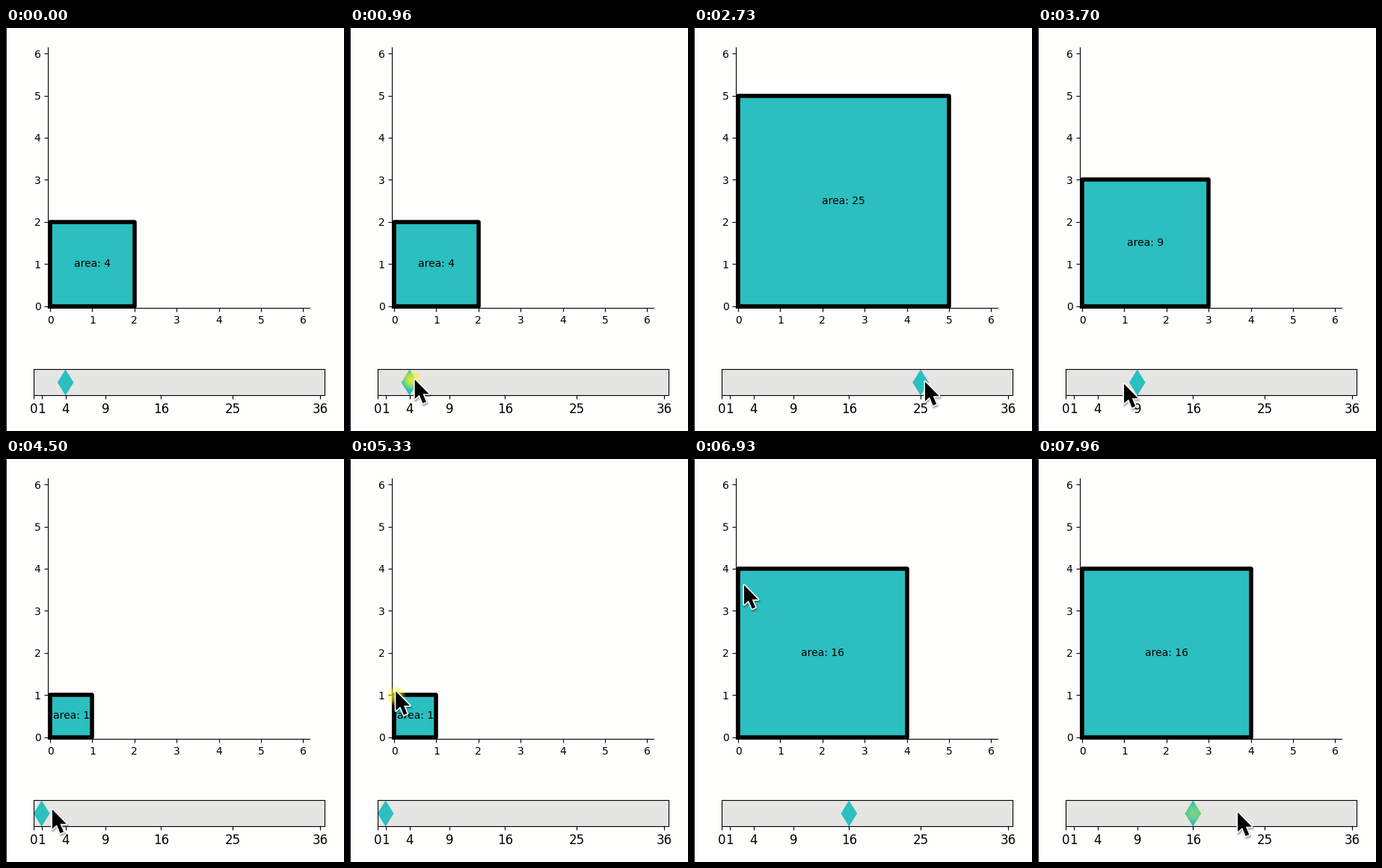
Recreate the animation shown at these times as a matplotlib script. Size 452x540 px, loop 8 s.

```python
import matplotlib.pyplot as plt
import numpy as np
from matplotlib.animation import FuncAnimation
from matplotlib.patches import Polygon, Rectangle

W, H, DPI = 452, 540, 100
LOOP, STEP = 8000, 25
TEAL, PAPER = "#2bbfbf", "#fefefd"
PT = 72 / DPI  # points per pixel

plt.rcParams["font.family"] = "DejaVu Sans"

# Cursor path: start time, end time, Bezier control (or None), end point.
ENTER = 60
START = (450, 293)
MOVES = [
    (60, 630, (180, 515), (82, 471)),
    (860, 1660, None, (214.5, 471)),
    (1700, 2060, None, (310, 474)),
    (2400, 2430, None, (309, 474)),
    (2730, 2800, None, (300, 476)),
    (3030, 3830, None, (101, 477)),
    (3930, 4200, None, (52, 477)),
    (4430, 4960, (160, 400), (61, 318)),
    (5220, 6000, (64, 250), (56, 181)),
    (6030, 6100, None, (56, 166.5)),
    (6300, 6360, None, (63.5, 169)),
    (6730, 6930, None, (67, 169)),
    (7000, 7400, (150, 420), (235, 490)),
    (7400, 7540, None, (208, 475)),
    (7620, 8100, None, (285, 473)),
]
# The slider snaps to square numbers, so the side length jumps.
SIDES = [(0, 2), (1140, 3), (1420, 4), (1930, 5), (3340, 4), (3580, 3),
         (3820, 2), (4180, 1), (5540, 2), (5760, 3), (6300, 4)]
PRESSES = [(860, (82, 472)), (5200, (61, 318.5)), (7600, (208, 475))]
GLOW_MS, GLOW_R = 600, 14
ARROW = np.array([(0, 0), (0, 26), (6, 20.6), (10.6, 31.8), (15.2, 29.9),
                  (10.7, 19.2), (18.8, 19.2)])


def cursor_at(t):
    pos = np.array(START, float)
    for t0, t1, control, end in MOVES:
        if t < t0:
            break
        end = np.array(end, float)
        s = min(1, (t - t0) / (t1 - t0))
        s = 1 - (1 - s) ** 2 if t0 == ENTER else s * s * (3 - 2 * s)
        mid = (pos + end) / 2 if control is None else np.array(control)
        pos = (1 - s) ** 2 * pos + 2 * s * (1 - s) * mid + s * s * end
    return pos


def side_at(t):
    return [side for start, side in SIDES if start <= t][-1]


def pixel_axes(x, y, w, h):
    return fig.add_axes([x / W, 1 - (y + h) / H, w / W, h / H])


# The small margin keeps the pixel size from rounding down.
fig = plt.figure(figsize=((W + 0.01) / DPI, (H + 0.01) / DPI), dpi=DPI,
                 facecolor=PAPER)

# Square plot
UNIT = 56.4
plot = pixel_axes(56.2, 25.7, 6.2 * UNIT, 6.2 * UNIT)
plot.set(xlim=(-0.05, 6.15), ylim=(-0.05, 6.15), xticks=range(7),
         yticks=range(7), facecolor=PAPER)
plot.spines[["top", "right"]].set_visible(False)
square = Polygon([(0, 0), (1, 0), (1, 1), (0, 1)], facecolor=TEAL,
                 edgecolor="black", lw=4, joinstyle="round", clip_on=False)
plot.add_patch(square)
label = plot.text(0, 0, "", ha="center", va="center", fontsize=10)

# Slider
slider = pixel_axes(37, 457.5, 388.5, 35)
slider.set(xlim=(0, 36.5), ylim=(-1, 1), yticks=[], facecolor="#e5e5e4",
           xticks=[n * n for n in range(7)])
slider.tick_params(labelsize=12)
handle = Polygon([(0, 0), (1, 1), (1, 0)], facecolor=TEAL, lw=0)
slider.add_patch(handle)

# Overlay in stage pixels
stage = fig.add_axes([0, 0, 1, 1])
yy, xx = np.mgrid[-1:1:57j, -1:1:57j]
halo = np.ones((57, 57, 4)) * (1, 0.96, 0.1, 1)
halo[..., 3] = 0.95 * np.clip(1 - xx ** 2 - yy ** 2, 0, 1) ** 1.2
glow = stage.imshow(halo, extent=(0, 1, 1, 0), aspect="auto", zorder=2)
stage.set(xlim=(0, W), ylim=(H, 0), autoscale_on=False)
stage.axis("off")
stage.add_patch(Rectangle((0, 0), 1, H, facecolor="#20202a", lw=0))


def arrow(offset, color, width, alpha=1):
    patch = Polygon(ARROW, facecolor=color, edgecolor=color, lw=width * PT,
                    alpha=alpha, joinstyle="round", zorder=3)
    stage.add_patch(patch)
    return patch, np.array(offset)


arrows = [arrow((1, 2.5), "black", 5, 0.1), arrow((1, 2), "black", 3.5, 0.15),
          arrow((0, 0), "white", 3.2), arrow((0, 0), "black", 0)]


def draw(i):
    t = i * STEP
    side = side_at(t)
    square.set_xy([(0, 0), (side, 0), (side, side), (0, side)])
    label.set_position((side / 2, side / 2))
    label.set_text(f"area: {side * side}")
    x = side * side
    handle.set_xy([(x - 1.02, 0), (x, 1), (x + 1.02, 0), (x, -1)])

    glow.set_visible(False)
    for start, (px, py) in PRESSES:
        if start <= t < start + GLOW_MS:
            glow.set_extent((px - GLOW_R, px + GLOW_R, py + GLOW_R, py - GLOW_R))
            glow.set_alpha(1 - (t - start) / GLOW_MS)
            glow.set_visible(True)

    tip = cursor_at(t)
    for patch, offset in arrows:
        patch.set_xy(ARROW + tip + offset)
        patch.set_visible(t >= ENTER)
    return square, label, handle, glow, *[p for p, _ in arrows]


anim = FuncAnimation(fig, draw, frames=LOOP // STEP, interval=STEP,
                     repeat=True, repeat_delay=0)
plt.show()
```
